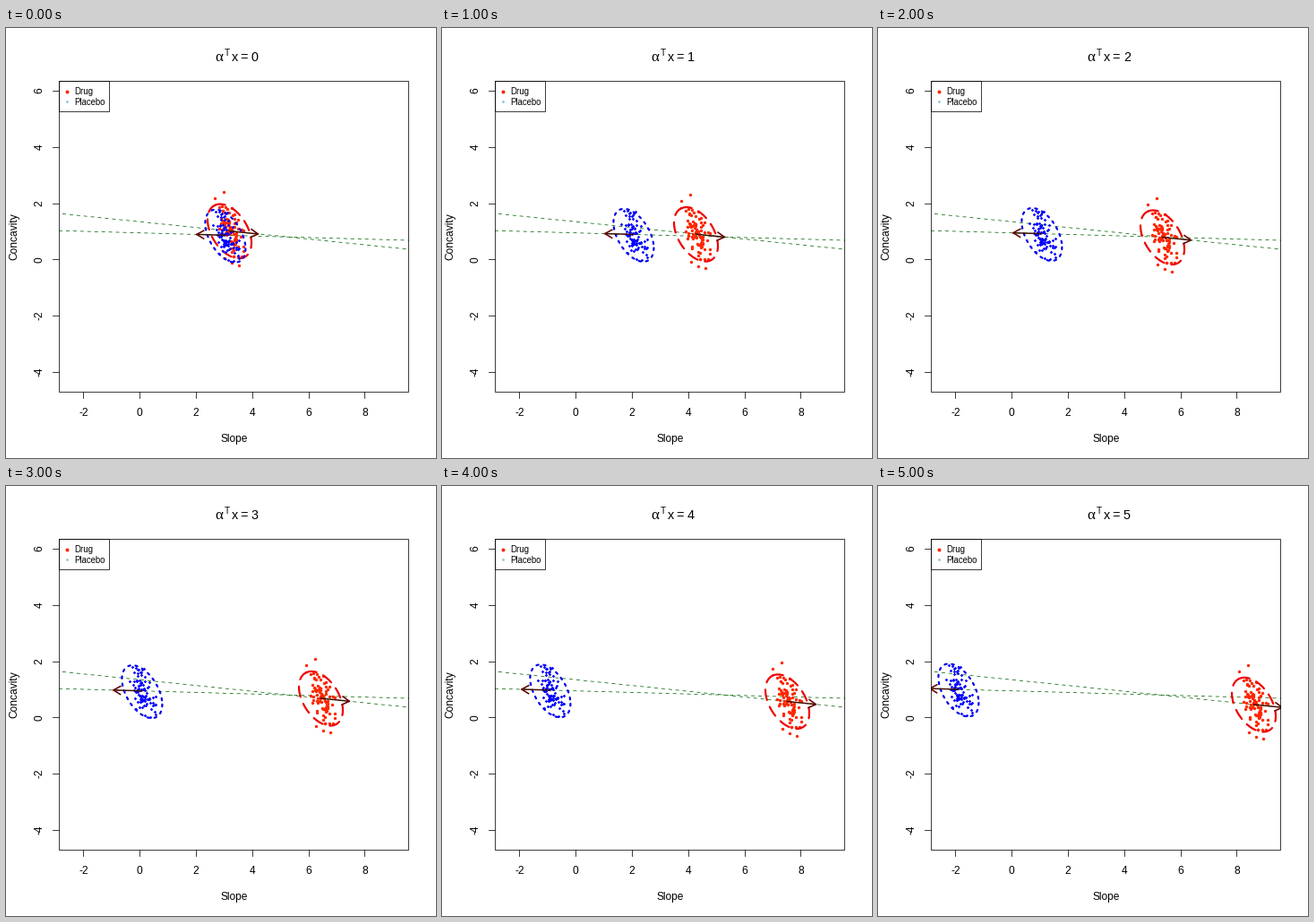
A matplotlib script for the animation above (6 s loop, 480x480 px).

```python
import numpy as np
import matplotlib.pyplot as plt
from matplotlib.animation import FuncAnimation
from matplotlib.patches import Rectangle

SIZE, DPI = 480, 72            # at 72 dpi one point is one pixel
LEFT, RIGHT, TOP, BOTTOM = 59, 450, 59, 407
UNIT = 31.43                   # pixels per data unit
THIN = 0.75                    # weight of the frame, ticks and guides
ARROW = 32                     # arrow length in pixels

plt.rcParams["font.family"] = "Liberation Sans"
fig = plt.figure(figsize=(SIZE / DPI, SIZE / DPI), dpi=DPI, facecolor="white")
ax = fig.add_axes([LEFT / SIZE, 1 - BOTTOM / SIZE,
                   (RIGHT - LEFT) / SIZE, (BOTTOM - TOP) / SIZE])
ax.set(xlim=(LEFT, RIGHT), ylim=(BOTTOM, TOP))
ax.axis("off")


def line(x, y, color="black", lw=THIN, z=2, **kw):
    return ax.plot(x, y, color=color, lw=lw, zorder=z, **kw)[0]


def label(x, y, s, size=12, **kw):
    kw = {"ha": "center", "va": "baseline", "zorder": 10, **kw}
    return ax.text(x, y, s, fontsize=size, **kw)


def box(x0, y0, x1, y1, z, fill="none"):
    ax.add_patch(Rectangle((x0, y0), x1 - x0, y1 - y0, fc=fill, ec="black",
                           lw=THIN, zorder=z, clip_on=False))


def draw_axes():
    box(59, 59, 449, 406, 9)
    for v in range(-2, 10, 2):
        x = 149 + v * UNIT
        line([x, x], [406, 413], clip_on=False)
        label(x + 0.2, 433, str(v))
    for v in range(-4, 8, 2):
        y = 258.4 - v * UNIT
        line([52, 59], [y, y], clip_on=False)
        label(43.5, y - 0.2, str(v), rotation=90, ha="right", va="center")
    label(254.4, 462, "Slope")
    label(15.8, 232.6, "Concavity", rotation=90, ha="right", va="center")


def draw_legend():
    box(59, 59, 115, 93, 8, "white")
    ax.plot(67.6, 70.7, "o", color="#ff2600", ms=4, mew=0, zorder=9)
    ax.plot(67.6, 82.3, "D", color="#8fc4d8", ms=2.5, mew=0, zorder=9)
    label(76, 74, "Drug", 9.6, ha="left")
    label(76, 86, "Placebo", 9.6, ha="left")


def draw_title():
    label(233.5, 37, "α", 17, ha="left", family="Liberation Serif")
    label(243.4, 31, "T", 10, ha="left")
    label(252.2, 37, "x", 14.4, ha="left")
    label(261.3, 37, "=", 14.4, ha="left")
    return label(273.8, 37, "0", 14.4, ha="left")


def cloud(n, slope, spread, seed):
    """Tall narrow cloud leaning to the right as it goes down."""
    rng = np.random.default_rng(seed)
    y = np.clip(rng.normal(0, 14, n), -27, 28)
    x = slope * y + np.clip(rng.normal(0, spread, n), -11, 11)
    return np.column_stack([x, y])


def oval(w, h, rho, start):
    t = np.radians(start) + np.linspace(0, 2 * np.pi, 200)
    return np.column_stack([w * np.cos(t), h * np.cos(t - np.arccos(rho))])


def arrow_head(tip):
    """Two barbs of 9 px at 30 degrees, relative to the tail."""
    a = np.arctan2(tip[1], tip[0])
    barbs = [tip - 9 * np.array([np.cos(a + s), np.sin(a + s)])
             for s in (np.pi / 6, -np.pi / 6)]
    return np.array([barbs[0], tip, barbs[1]])


class Group:
    def __init__(self, centre, step, drop, dots, ring, color, dot_color,
                 marker, ms, dash, z):
        self.centre, self.step = np.array(centre), np.array(step)
        shift = np.array([0, drop])
        tip = self.step * ARROW / np.hypot(*step)
        shapes = [dots + shift, ring + shift,
                  np.array([[0, 0], tip]), arrow_head(tip)]
        lines = [
            line([], [], dot_color, 0, z, marker=marker, ms=ms, mew=0,
                 snap=False),
            line([], [], color, 2.2, z + 0.1, ls=(0, dash),
                 dash_capstyle="round"),
            line([], [], "#401000", 1.5, 6),
            line([], [], "#640000", 1.6, 6.1, solid_joinstyle="round"),
        ]
        self.parts = list(zip(lines, shapes))

    def move(self, k):
        at = self.centre + k * self.step
        for artist, shape in self.parts:
            artist.set_data(*(shape + at).T)
        return [artist for artist, _ in self.parts]


draw_axes()
draw_legend()
digit = draw_title()

# the two discriminant directions
for x0, y0, y1 in ((LEFT, 226.2, 237), (63, 207.4, 247.1)):
    line([x0, RIGHT], [y0, y1], "#006400", ls=(0, (5.3, 5.3)))

outer_drug = np.array([
    (-7, -44), (-16.5, -37), (-8.5, -28), (-2.5, -24.5), (-9.5, -15),
    (-5.5, 30.5), (2.5, 35.5), (10.5, 38), (15.5, 17), (13.5, -2),
    (15.5, -1), (7.5, -10), (-12, -3), (4, 28)])
outer_placebo = np.array([
    (-11, -27.5), (-3.5, -25), (-14, -12), (-9, -22), (15, 5),
    (3, 26.5), (9, 28), (12, 15), (15, 14)])

drug = Group((249.5, 226.7), (34, 3.45), 0.2,
             np.vstack([outer_drug, cloud(72, 0.16, 5, 4) + [0.5, 0]]),
             oval(24.5, 30.3, 0.43, -132), "#ee0000", "#ff2600",
             "o", 3.4, (5.4, 3.7), 3)
placebo = Group((244.9, 231.3), (-31, -0.86), 0.9,
                np.vstack([outer_placebo, cloud(80, 0.2, 5, 11)]),
                oval(22.5, 29.5, 0.48, 0), "#0000ee", "#0000ff",
                "D", 2.5, (1.1, 2.6), 4)


def update(k):
    digit.set_text(str(k))
    return [digit, *drug.move(k), *placebo.move(k)]


anim = FuncAnimation(fig, update, frames=6, init_func=lambda: update(0),
                     interval=1000, repeat=True, repeat_delay=0, blit=False)
plt.show()
```
